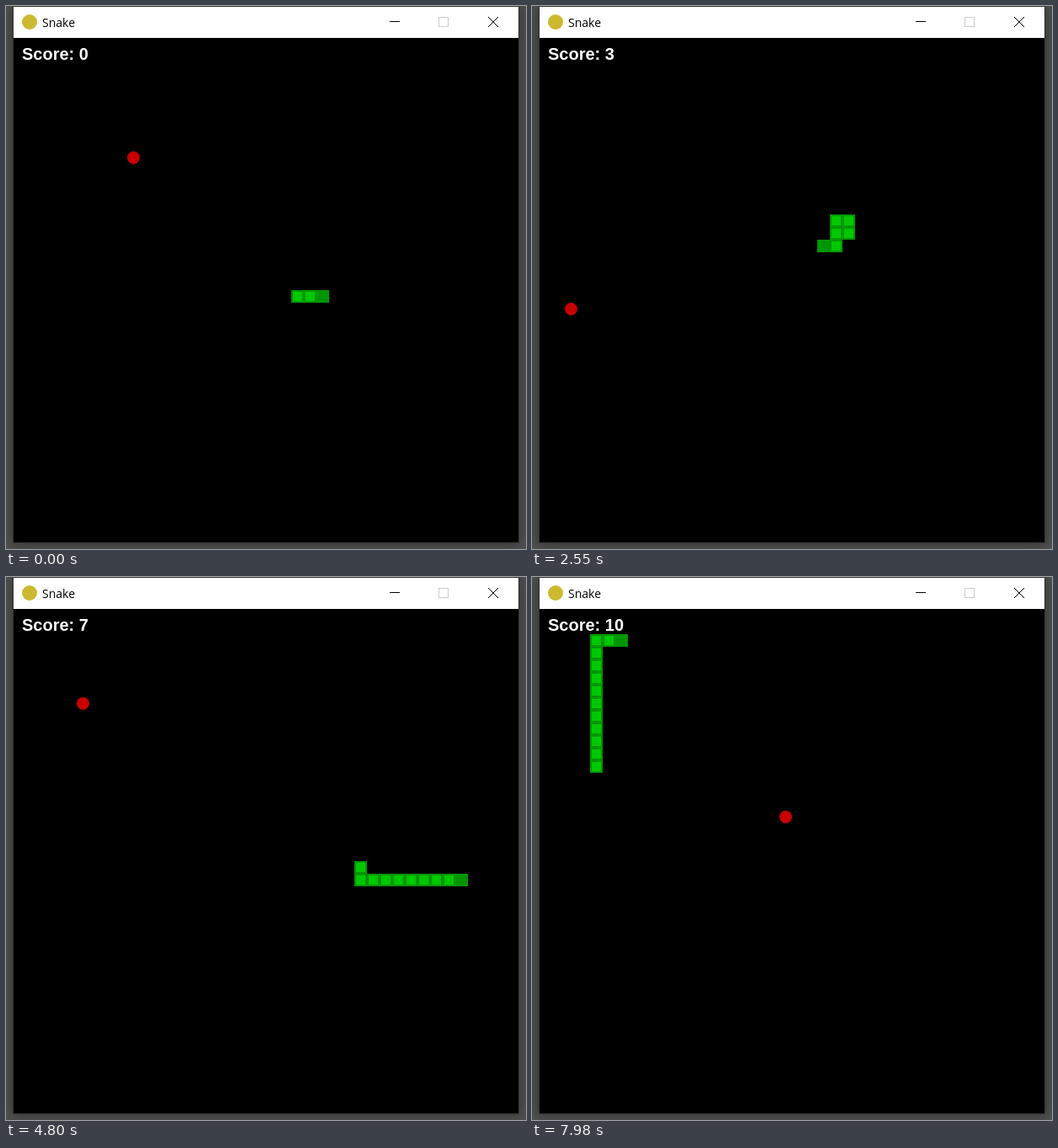
Recreate the animation shown at these times as an HTML page with a canvas. Size 618 by 646 pixels, loop 8000 ms.

```html
<!DOCTYPE html>
<html lang="en">
<head>
<meta charset="utf-8">
<title>Snake</title>
<style>
  html, body { margin: 0; width: 100%; height: 100%; overflow: hidden; background: #4e4e4e; }
  canvas { display: block; }
</style>
</head>
<body>
<canvas id="stage" width="618" height="646"></canvas>
<script>
const ctx = document.getElementById('stage').getContext('2d');
const LOOP = 8000, TICK = 78.2;
const CELL = 15, LEFT = 9, TOP = 38, SIZE = 600, START_LENGTH = 3;

// The snake turns at every leg: these are, alternately, the column and the row it heads for.
const start = [22, 20];
const legs = [
  38, 9, 29, 11, 39, 9, 9, 27, 24, 14, 23, 16, 2, 21, 6, 18, 37,
  15, 12, 20, 27, 21, 38, 19, 5, 7, 27, 27, 39, 23, 4, 2, 19, 16
];
// Cells along the route that hold food.
const meals = [80, 105, 126, 155, 196, 225, 249, 300, 351, 411, 443];
// Key points of the speed: ticks passed, cells moved.
const pace = [[0, 0], [13, 53], [32, 128], [43, 175], [102, 414]];

function buildRoute() {
  const route = [start];
  legs.forEach((goal, leg) => {
    const axis = leg % 2;
    let cell = route[route.length - 1];
    while (cell[axis] !== goal) {
      cell = [...cell];
      cell[axis] += Math.sign(goal - cell[axis]);
      route.push(cell);
    }
  });
  return route;
}
const route = buildRoute();

function movesAt(time) {
  const ticks = Math.floor(time / TICK);
  const next = pace.findIndex(([tick]) => tick > ticks);
  if (next < 0) return pace[pace.length - 1][1];
  const [t0, m0] = pace[next - 1], [t1, m1] = pace[next];
  return Math.round(m0 + (m1 - m0) * (ticks - t0) / (t1 - t0));
}

function rect(color, x, y, w, h) {
  ctx.fillStyle = color;
  ctx.fillRect(x, y, w, h);
}

function disc(color, x, y, radius) {
  ctx.fillStyle = color;
  ctx.beginPath();
  ctx.arc(x, y, radius, 0, 2 * Math.PI);
  ctx.fill();
}

function text(string, font, color, x, y) {
  ctx.font = font;
  ctx.fillStyle = color;
  ctx.fillText(string, x, y);
}

function drawWindow() {
  rect('#4e4e4e', 0, 0, 618, 646);
  ctx.save();
  ctx.shadowColor = 'rgba(0,0,0,.35)';
  ctx.shadowBlur = 12;
  rect('#333', LEFT - 1, 0, SIZE + 2, TOP + SIZE + 1);
  ctx.restore();
  rect('#fff', LEFT, 1, SIZE, TOP - 1);
  rect('#000', LEFT, TOP, SIZE, SIZE);

  disc('#cdb92f', 28, 19, 9);
  text('Snake', '14px "Open Sans", sans-serif', '#000', 43, 25);

  rect('#000', 456, 18, 12, 1);
  ctx.lineWidth = 1;
  ctx.strokeStyle = '#ccc';
  ctx.strokeRect(514.5, 13.5, 11, 11);
  ctx.strokeStyle = '#000';
  ctx.beginPath();
  ctx.moveTo(573, 13);
  ctx.lineTo(585, 25);
  ctx.moveTo(585, 13);
  ctx.lineTo(573, 25);
  ctx.stroke();
}

function drawGame(time) {
  const head = movesAt(time) + START_LENGTH - 1;
  const score = meals.filter(meal => meal <= head).length;
  const place = ([col, row]) => [LEFT + col * CELL, TOP + row * CELL];

  const [foodX, foodY] = place(route[meals[score]]);
  disc('#c80000', foodX + CELL / 2, foodY + CELL / 2, CELL / 2);

  for (let i = head - START_LENGTH - score + 1; i <= head; i++) {
    const [x, y] = place(route[i]);
    rect('#009600', x, y, CELL, CELL);
    if (i < head) rect('#00c800', x + 2, y + 2, CELL - 4, CELL - 4);
  }
  text('Score: ' + score, 'bold 20px "Liberation Sans", Arial, sans-serif', '#fff', 19, 64);
}

function frame() {
  drawWindow();
  drawGame(performance.now() % LOOP);
  requestAnimationFrame(frame);
}
frame();
</script>
</body>
</html>
```
